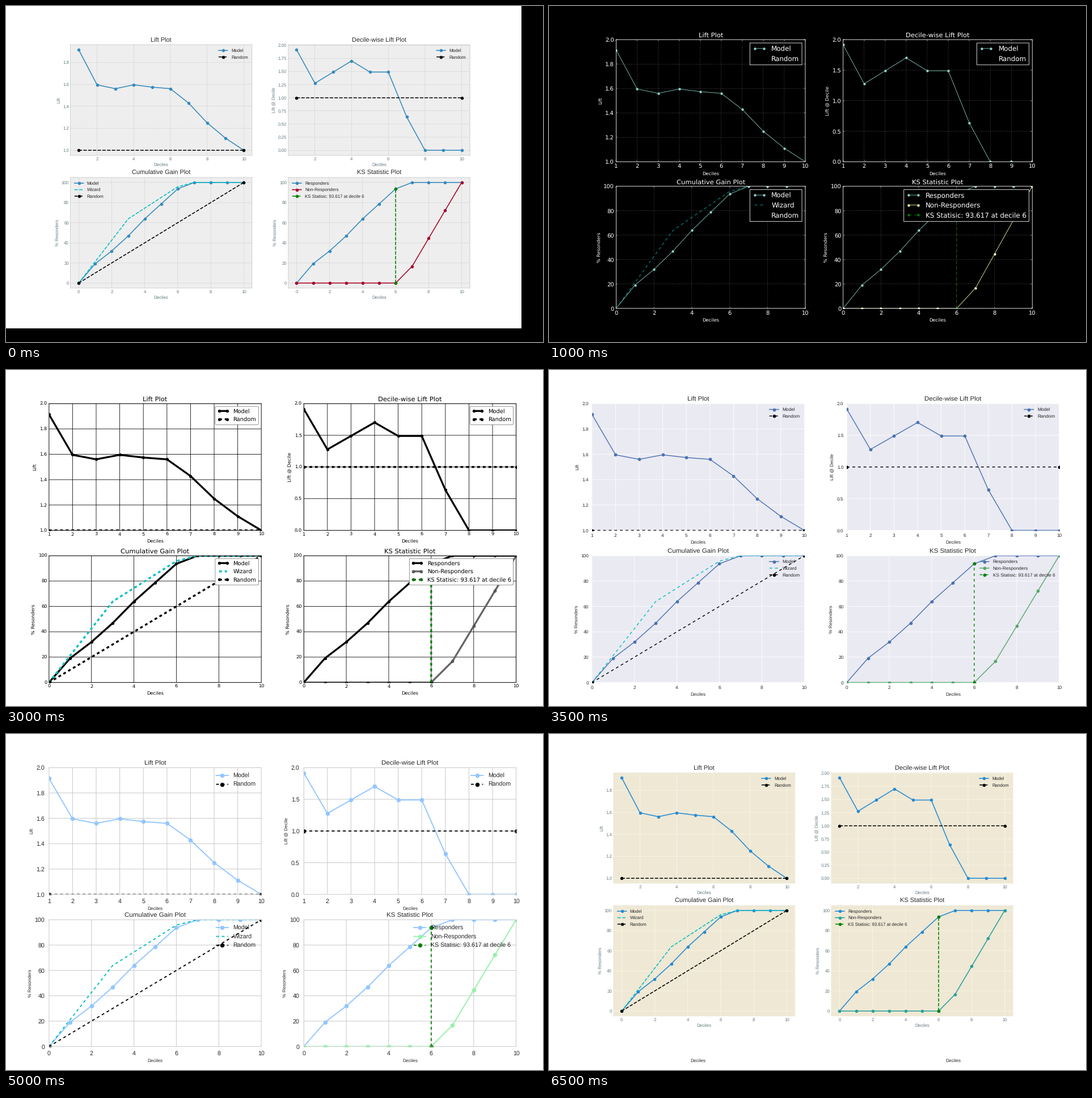
Write a matplotlib script that moves like this. It is 947x592 px and loops after 7 s.

```python
import math

import numpy as np
import matplotlib.pyplot as plt
from matplotlib.animation import FuncAnimation
from matplotlib.patches import Rectangle

W, H = 947, 592
SMALL = (909, 568)
DPI = W / 16

# Keep lines and glyphs at their exact subpixel sizes and places
plt.rcParams.update({"lines.scale_dashes": False, "path.snap": False,
                     "text.hinting": "no_hinting"})

# Cumulative response per decile
deciles = np.arange(11)
gain = np.array([0, 9, 15, 22, 30, 37, 44, 47, 47, 47, 47]) / 47 * 100
misses = np.array([0, 0, 0, 0, 0, 0, 0, 3, 8, 13, 18]) / 18 * 100
wizard = np.array([0, 10, 20, 30, 35, 40, 45, 47, 47, 47, 47]) / 47 * 100
lift = gain[1:] / deciles[1:] / 10
decile_lift = np.diff(gain) / 10

# Each series: x, y, colour (an int picks from the style's cycle), dashed, marker, label
FLAT = ([1, 10], [1, 1], "black", True, "o", "Random")
CHARTS = [
    dict(title="Lift Plot", ylabel="Lift", extent=(1, 10, 1, lift[0]), tight=(1, 10, 1, 2),
         steps=((1, 0.2), (2, 0.2)), formats=("%.1f", "%.1f"),
         series=[(deciles[1:], lift, 0, False, "o", "Model"), FLAT]),
    dict(title="Decile-wise Lift Plot", ylabel="Lift @ Decile",
         extent=(1, 10, 0, lift[0]), tight=(1, 10, 0, 2),
         steps=((1, 0.5), (2, 0.25)), formats=("%.1f", "%.2f"),
         series=[(deciles[1:], decile_lift, 0, False, "o", "Model"), FLAT]),
    dict(title="Cumulative Gain Plot", ylabel="% Resonders",
         extent=(0, 10, 0, 100), tight=(0, 10, 0, 100),
         steps=((2, 20), (2, 20)), formats=("%d", "%d"),
         series=[(deciles, gain, 0, False, "o", "Model"),
                 (deciles, wizard, "#00bfbf", True, None, "Wizard"),
                 ([0, 10], [0, 100], "black", True, "o", "Random")]),
    dict(title="KS Statistic Plot", ylabel="% Resonders",
         extent=(0, 10, 0, 100), tight=(0, 10, 0, 100),
         steps=((2, 20), (2, 20)), formats=("%d", "%d"),
         series=[(deciles, gain, 0, False, "o", "Responders"),
                 (deciles, misses, 1, False, "o", "Non-Responders"),
                 ([6, 6], [0, gain[6]], "green", True, "o",
                  "KS Statisic: 93.617 at decile 6")]),
]

# Styles build on one another; all sizes are in points
solarized = dict(
    size=SMALL, box=(0.125, 0.125, 0.9, 0.88), loose=True, font="Liberation Sans",
    bg="white", face="#eee8d5", edge="#eee8d5", spine=0.8,
    text="0.15", label="#657b83", tick_color="#657b83", tick_font=10,
    tick=(0, 1, "out"), pad=3.5, label_pad=4, title_pad=6,
    grid=("#fdf6e3", 1, "-"), below=True,
    cycle=("#268bd2", "#2aa198"), lw=2, dash=(7.4, 3.2), ms=7, mew=0,
    frame=None, fancy=True, legend_font=10, points=1)
bmh = solarized | dict(
    face="#eeeeee", edge="#bcbcbc", grid=("#b2b2b2", 0.5, (0, (1.85, 0.8))),
    cycle=("#348abd", "#a60628"))
classic = dict(
    size=(W, H), box=(0.125, 0.1, 0.9, 0.9), loose=False, font="DejaVu Sans",
    bg="white", face="white", edge="black", spine=1,
    text="black", label="black", tick_color="black", tick_font=12,
    tick=(4, 0.5, "in"), pad=4, label_pad=5, title_pad=5,
    grid=("black", 0.5, (0, (1, 3))), below=False,
    cycle=("blue", "green"), lw=1, dash=(6, 6), ms=6, mew=0.5,
    frame=1, fancy=False, legend_font=14.4, points=2)
dark = classic | dict(
    bg="black", face="black", edge="white", text="white", label="white",
    tick_color="white", grid=("white", 0.5, (0, (1, 3))), cycle=("#8dd3c7", "#feffb3"))
poll = dark | dict(
    box=(0.08, 0.07, 0.95, 0.9), bg="#f0f0f0", face="#f0f0f0", edge="#f0f0f0", spine=3,
    tick=(0, 0.5, "in"), tick_font=14, grid=("#cbcbcb", 1, "-"), below=True,
    cycle=("#008fd5", "#fc4f30"), lw=4, frame=0.5, fancy=True, legend_font=16.8)
ggplot = poll | dict(
    face="#e5e5e5", edge="white", spine=1, label="#555555", tick_color="#555555",
    tick_font=10, grid=("white", 1, "-"), cycle=("#e24a33", "#348abd"), legend_font=12)
grayscale = ggplot | dict(
    bg="white", face="white", edge="black", text="black", label="black",
    tick_color="black", grid=("black", 1, "-"), cycle=("0", "0.4"))
seaborn = grayscale | dict(
    font="Liberation Sans", face="#eaeaf2", edge="white", spine=0, text="0.15",
    label="0.15", tick_color="0.15", tick=(0, 1, "out"), pad=7, grid=("white", 1, "-"),
    cycle=("#4c72b0", "#55a868"), lw=1.75, ms=7, mew=0,
    frame=None, legend_font=10, points=1)
ticks = seaborn | dict(
    face="white", edge="0.15", spine=1.25, tick=(6, 1, "out"), tick_font=13, pad=9.1,
    grid=("0.8", 1.3, "-"), cycle=("#92c6ff", "#97f0aa"), lw=2.275, ms=9.1,
    legend_font=13)
white = ticks | dict(tick=(0, 1, "out"))
whitegrid = white | dict(edge="0.8", spine=1)
tableau = whitegrid | dict(cycle=("#006ba4", "#ff800e"))

# One entry per half second: later layers are pasted over earlier ones
SLIDES = [[bmh], [classic], [dark], [dark], [poll], [ggplot], [grayscale], [seaborn],
          [ticks], [white], [whitegrid], [whitegrid, solarized], [tableau],
          [tableau, solarized]]

fig = plt.figure(figsize=(16, (H + 0.01) / DPI), dpi=DPI)


def tick_values(low, high, step):
    first = math.ceil(low / step) * step
    return [v + 0.0 for v in np.arange(first, high + 1e-9, step)]


def chart_position(style, index):
    w, h = style["size"]
    left, bottom, right, top = style["box"]
    row, col = divmod(index, 2)
    cw, ch = (right - left) * w / 2.2, (top - bottom) * h / 2.2
    x = left * w + col * 1.2 * cw
    y = (1 - top) * h + row * 1.2 * ch
    return [x / W, 1 - (y + ch) / H, cw / W, ch / H]


def set_scales(ax, chart, style):
    loose = style["loose"]
    x0, x1, y0, y1 = chart["extent"] if loose else chart["tight"]
    if loose:
        mx, my = 0.05 * (x1 - x0), 0.05 * (y1 - y0)
        x0, x1, y0, y1 = x0 - mx, x1 + mx, y0 - my, y1 + my
    xstep, ystep = chart["steps"][loose]
    xs, ys = tick_values(x0, x1, xstep), tick_values(y0, y1, ystep)
    ax.set_xticks(xs, ["%d" % v for v in xs])
    ax.set_yticks(ys, [chart["formats"][loose] % v for v in ys])
    ax.set_xlim(x0, x1)
    ax.set_ylim(y0, y1)


def draw_legend(ax, index, style, k):
    corner = "upper left" if style["loose"] and index > 1 else "upper right"
    framed = style["frame"] is not None
    legend = ax.legend(
        loc=corner, numpoints=style["points"], frameon=framed, framealpha=1,
        facecolor=style["face"], edgecolor=style["edge"], fancybox=style["fancy"],
        labelcolor=style["text"],
        prop=dict(family=style["font"], size=style["legend_font"] * k))
    if framed:
        legend.get_frame().set_linewidth(style["frame"])


def draw_chart(index, style, zorder):
    chart = CHARTS[index]
    k = style["size"][0] / W
    font = style["font"]
    ax = fig.add_axes(chart_position(style, index), facecolor=style["face"], zorder=zorder)

    for x, y, color, dashed, marker, label in chart["series"]:
        color = style["cycle"][color] if isinstance(color, int) else color
        dash = (0, tuple(d * k for d in style["dash"]))
        ax.plot(x, y, color=color, linestyle=dash if dashed else "-", lw=style["lw"] * k,
                marker=marker, ms=style["ms"] * k, mew=style["mew"] * k,
                mec="black" if style["mew"] else color, label=label)

    set_scales(ax, chart, style)
    color, width, line = style["grid"]
    ax.grid(True, color=color, lw=width * k, ls=line)
    ax.set_axisbelow(style["below"])
    for spine in ax.spines.values():
        spine.set(edgecolor=style["edge"], linewidth=style["spine"] * k,
                  visible=style["spine"] > 0)
    length, width, direction = style["tick"]
    ax.tick_params(length=length * k, width=width * k, direction=direction,
                   top=length > 0, right=length > 0, color=style["tick_color"],
                   pad=style["pad"] * k, labelsize=style["tick_font"] * k,
                   labelcolor=style["tick_color"], labelfontfamily=font)

    label = dict(fontsize=10 * k, family=font, color=style["label"],
                 labelpad=style["label_pad"] * k)
    ax.set_xlabel("Deciles", **label)
    ax.set_ylabel(chart["ylabel"], **label)
    ax.set_title(chart["title"], fontsize=14 * k, family=font, color=style["text"],
                 pad=style["title_pad"] * k)
    draw_legend(ax, index, style, k)


def draw_layer(style, depth):
    w, h = style["size"]
    fig.add_artist(Rectangle((0, 1 - h / H), w / W, h / H, facecolor=style["bg"],
                             linewidth=0, antialiased=False, zorder=depth))
    for index in range(len(CHARTS)):
        draw_chart(index, style, depth + 1)


def update(frame):
    fig.clear()
    fig.patch.set_facecolor("black")
    for i, style in enumerate(SLIDES[frame]):
        draw_layer(style, 2 * i)
    return []


anim = FuncAnimation(fig, update, frames=len(SLIDES), interval=500,
                     init_func=lambda: [], repeat=True, repeat_delay=0, blit=False)
update(0)
plt.show()
```
